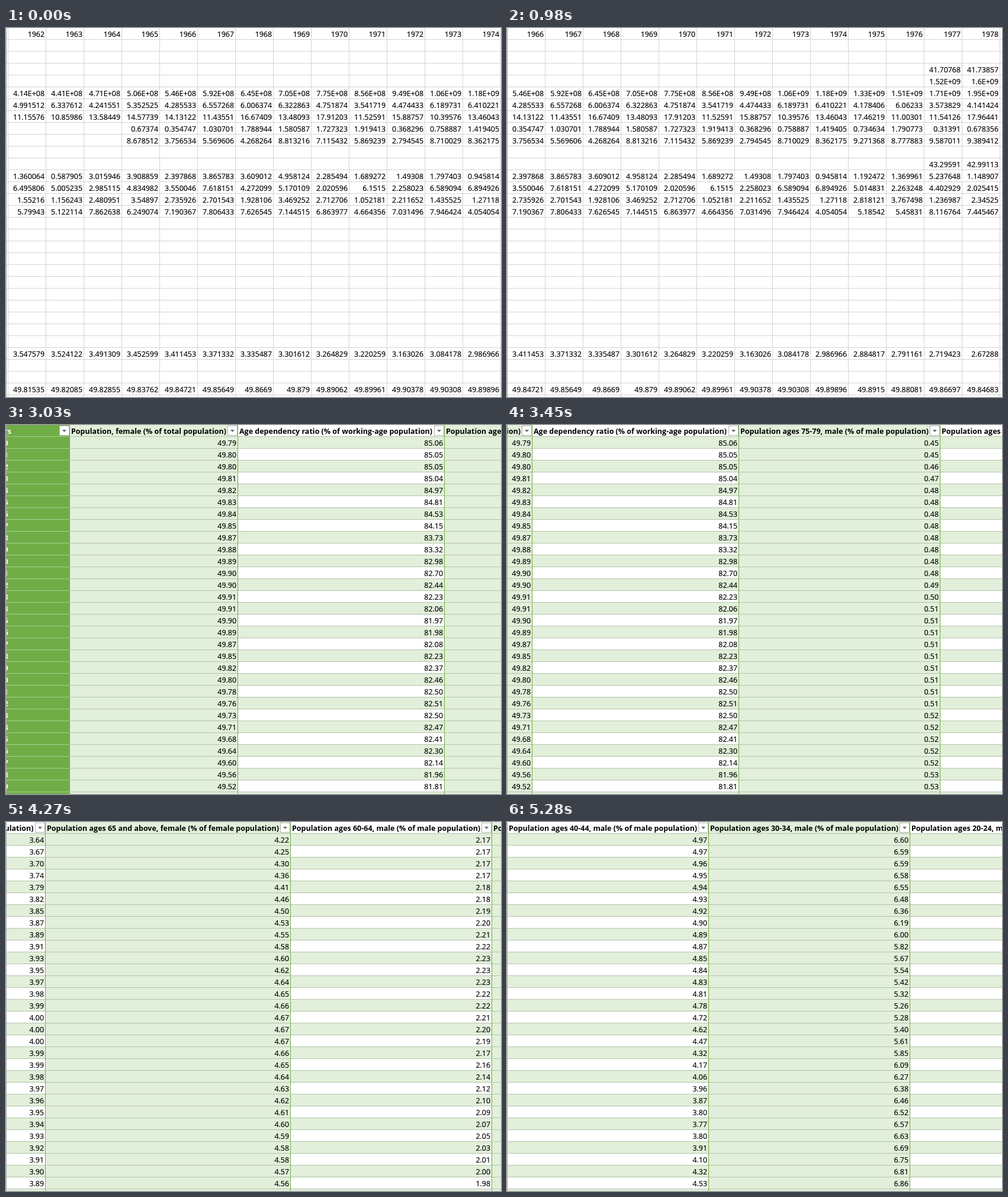
These frames come from a looping animation (836 by 623 pixels, 5.72 s). An HTML page:

```html
<!DOCTYPE html>
<html lang="en">
<head>
<meta charset="utf-8">
<title>Scrolling sheets</title>
<style>
  html, body { margin: 0; width: 100%; height: 100%; overflow: hidden; background: #fff; }
  svg { display: block; width: 836px; height: 623px; }
  text { font: 12.4px "Open Sans", sans-serif; fill: #000; stroke: #000; stroke-width: .2px; }
  .num { text-anchor: end; }
  .bold { font-weight: 700; font-size: 12.5px; stroke: none; }
  .white { fill: #fff; }
</style>
</head>
<body>
<svg id="stage" viewBox="0 0 836 623"></svg>
<script>
const W = 836, H = 623, ROW = 20, ROWS = 32, LOOP = 5720, SWITCH = 2160;
const GREEN = '#70ad47', PALE = '#e2efda', RULE = '#b5c4ab', GRID = '#d4d4d4';
const stage = document.getElementById('stage');

function add(parent, tag, attrs, text) {
  const el = document.createElementNS('http://www.w3.org/2000/svg', tag);
  for (const key in attrs) el.setAttribute(key, attrs[key]);
  if (text) el.textContent = text;
  parent.appendChild(el);
  return el;
}
const rect = (g, x, y, width, height, fill) => add(g, 'rect', { x, y, width, height, fill });
const label = (g, x, row, text, cls) => add(g, 'text', { x, y: row * ROW + 15, class: cls }, text);

// Smooth curve through knots placed every five years
function curve(knots, year) {
  const i = Math.floor(year / 5), u = year / 5 - i;
  const at = k => knots[Math.max(0, Math.min(knots.length - 1, k))];
  const a = at(i - 1), b = at(i), c = at(i + 1), d = at(i + 2);
  return b + u / 2 * (c - a + u * (2 * a - 5 * b + 4 * c - d + u * (3 * (b - c) + d - a)));
}

let seed = 1962;
function random() {
  seed = (seed * 16807) % 2147483647;
  return seed / 2147483647;
}

// Raw sheet rules: row, first year, value by years since 1962
const FIRST_YEAR = 1962, YEARS = 17, CELL = 64;
const between = (low, high) => () => low + (high - low) * random();
const along = (...knots) => i => curve(knots, i);
const rawRows = [
  [3, 1977, between(41.7, 42.2)],
  [4, 1977, i => 1.52e9 * 1.05 ** (i - 15)],
  [5, 1962, i => 4.14e8 * Math.exp(0.06 * i + 0.0023 * i * i)],
  [6, 1962, between(3.2, 6.8)],
  [7, 1962, between(10, 18)],
  [8, 1965, between(0.2, 2.2)],
  [9, 1965, between(1, 9.9)],
  [11, 1977, between(42.9, 43.4)],
  [12, 1962, between(0.5, 5.4)],
  [13, 1962, between(2, 8)],
  [14, 1962, between(1, 3.9)],
  [15, 1962, between(4, 8.3)],
  [27, 1962, along(3.547579, 3.371332, 3.163026, 2.719423, 2.6)],
  [30, 1962, along(49.81535, 49.85649, 49.90378, 49.86697, 49.75)]
];

function general(v) {
  if (v >= 1e8) return Number(v.toPrecision(3)).toExponential().toUpperCase().replace('+', '+0');
  return String(Number(v < 1 ? v.toFixed(6) : v.toPrecision(7)));
}

function buildRaw() {
  const sheet = add(stage, 'g');
  rect(sheet, 0, 0, W, H, '#fff');
  for (let r = 0; r < ROWS; r++) rect(sheet, 0, r * ROW + 19, W, 1, GRID);
  const body = add(sheet, 'g');
  const edge = i => 3 + i * CELL;
  for (let i = 0; i <= YEARS; i++) rect(body, edge(i), 0, 1, H, GRID);
  for (let i = 0; i < YEARS; i++) label(body, edge(i + 1) - 2, 0, FIRST_YEAR + i, 'num');
  for (const [row, from, value] of rawRows)
    for (let i = from - FIRST_YEAR; i < YEARS; i++) label(body, edge(i + 1) - 2, row, general(value(i)), 'num');
  return { sheet, body };
}

// Table: title, width, curve knots from 1960 on
const ages = (range, sex) => `Population ages ${range}, ${sex} (% of ${sex} population)`;
const columns = [
  ['Population, female (% of total population)', 284, [49.79, 49.83, 49.89, 49.9, 49.8, 49.68, 49.49]],
  ['Age dependency ratio (% of working-age population)', 349, [85.06, 84.81, 82.98, 81.97, 82.46, 82.41, 81.7]],
  [ages('75-79', 'male'), 340, [0.45, 0.48, 0.48, 0.51, 0.51, 0.52, 0.53]],
  ['Population ages 65 and above (% of total population)', 351, [3.64, 3.82, 3.93, 4, 3.98, 3.93, 3.88]],
  [ages('65 and above', 'female'), 414, [4.22, 4.46, 4.6, 4.67, 4.64, 4.59, 4.56]],
  [ages('60-64', 'male'), 340, [2.17, 2.18, 2.23, 2.21, 2.14, 2.05, 1.97]],
  [ages('50-54', 'male'), 340, [3.55, 3.53, 3.5, 3.45, 3.35, 3.22, 2.78]],
  [ages('40-44', 'male'), 340, [4.97, 4.93, 4.85, 4.72, 4.06, 3.8, 4.66]],
  [ages('30-34', 'male'), 340, [6.6, 6.48, 5.67, 5.28, 6.27, 6.63, 6.89]],
  [ages('20-24', 'male'), 340, [8.9, 8.7, 9.1, 9.6]]
];

function filterButton(g, end) {
  add(g, 'rect', { x: end - 16.5, y: 1.5, width: 16, height: 16, fill: '#fff', stroke: '#b4b4b4' });
  add(g, 'path', { d: `M${end - 12} 8h7l-3.5 4z`, fill: '#666c75' });
}

function buildTable() {
  const sheet = add(stage, 'g');
  rect(sheet, 0, 0, W, H, '#fff');
  const body = add(sheet, 'g');
  const rules = (x, w, color) => {
    for (let r = 0; r < ROWS; r++) rect(body, x, r * ROW + 19, w, 1, color);
  };
  let x = 135;
  rect(body, 0, 0, x + 1, H, GREEN);
  rules(0, x + 1, '#a9d08e');
  label(body, 3, 0, 'Years', 'bold white');
  for (let r = 1; r <= 30; r++) label(body, 3, r, 1959 + r, 'bold white');
  filterButton(body, x);

  columns.forEach(([title, width, knots], i) => {
    const left = x + 1, end = x + width;
    if (i % 2 === 0) rect(body, left, 0, width, H, PALE);
    else for (let r = 1; r < ROWS; r += 2) rect(body, left, r * ROW, width, ROW, PALE);
    rules(left, width, RULE);
    rect(body, end, 0, 1, H, GREEN);
    label(body, x + 3, 0, title, 'bold');
    filterButton(body, end);
    for (let r = 1; r <= 30; r++) label(body, end - 2, r, curve(knots, r - 1).toFixed(2), 'num');
    x = end;
  });
  return { sheet, body };
}

// Scroll keys: time, offset, speed (px/ms), steps until the next key
const rawKeys = [[0, 0, 0.28, 12], [690, 191, 0.27, 5], [980, 259, 0.18, 1]];
const tableKeys = [[2970, 0, 0.4, 8], [3450, 377, 1.05, 14], [4270, 1393, 1.45, 9], [4800, 2184, 1.2, 8], [5280, 2553, 0.2, 1]];

function offsetAt(keys, t) {
  if (t <= keys[0][0]) return keys[0][1];
  const i = keys.findIndex(k => k[0] > t);
  if (i < 0) return keys[keys.length - 1][1];
  const [t0, x0, v0, n] = keys[i - 1], [t1, x1, v1] = keys[i];
  const d = t1 - t0, u = Math.floor((t - t0) / d * n + 1e-6) / n, w = 1 - u;
  return Math.round(w * w * (1 + 2 * u) * x0 + u * u * (3 - 2 * u) * x1 + d * u * w * (w * v0 - u * v1));
}

const raw = buildRaw(), table = buildTable();
rect(stage, 0, 0, 1, H, '#ababab');

function show(part, visible, keys, t) {
  part.sheet.setAttribute('visibility', visible ? 'visible' : 'hidden');
  if (visible) part.body.setAttribute('transform', `translate(${-offsetAt(keys, t)} 0)`);
}

let start;
function tick(now) {
  if (start === undefined) start = now;
  const t = (now - start) % LOOP;
  show(raw, t < SWITCH, rawKeys, t);
  show(table, t >= SWITCH, tableKeys, t);
  requestAnimationFrame(tick);
}
show(table, false);
requestAnimationFrame(tick);
</script>
</body>
</html>
```
